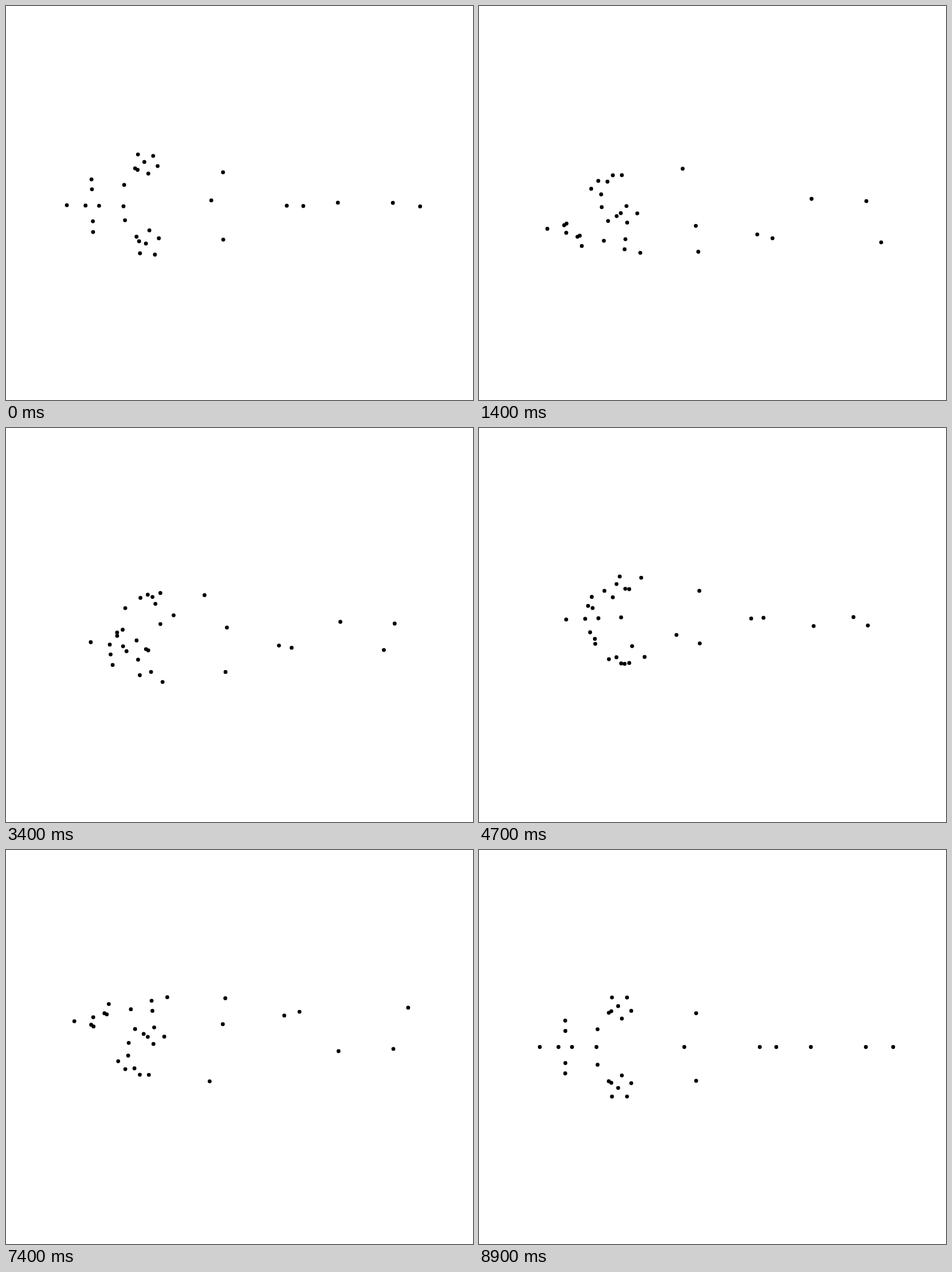
These frames come from a looping animation (815 by 687 pixels, 9000 ms). An HTML page with a canvas:

```html
<!DOCTYPE html>
<html lang="en">
<head>
<meta charset="utf-8">
<title>Rotating points</title>
<style>
  html, body { margin: 0; width: 100%; height: 100%; overflow: hidden; background: #fff; }
  canvas { display: block; }
</style>
</head>
<body>
<canvas id="stage" width="815" height="687"></canvas>
<script>
const canvas = document.getElementById('stage');
const ctx = canvas.getContext('2d');
const { width, height } = canvas;
const DISTANCE = 595, RADIUS = 3.4, TURN = 2 * Math.PI;
const STEP = 100, STEPS = 90;

const point = (x, y, z) => ({ x, y, z });
// Points on a straight line in the plane of symmetry
const line = (z0, slope, ...xs) => xs.map(x => point(x, 0, z0 + slope * x));
// A point and its reflection in that plane
const pair = (x, y, z) => [point(x, y, z), point(x, -y, z)];

const ridge = line(111, 0.222, -276.2, -243, -219.5, -178.2);
const keel = line(-16.8, 0.048, 174.1, 269.4);
const fin = [...line(39.3, 0.28, 74.2, 98.8), point(276, 0, 74.2), point(-55.3, 0, -73.4)];
const front = [pair(-229.6, 41.1, 63.4), pair(-234, 25.5, 52.7), pair(-203.7, 31.4, -9.4)];
const flank = [
  pair(-164.3, 51.5, -23), pair(-145.2, 64.6, -14.2), pair(-182.8, 60.3, -6),
  pair(-164, 71, 2.5), pair(-165.9, 81.7, 32.4), pair(-133.7, 77.4, 61.7),
  pair(-157.7, 55.8, 63.5)
];
const back = pair(-25.2, 52, 69.8);
const points = [...ridge, ...keel, ...fin, ...front.flat(), ...flank.flat(), ...back];

// Turn about the x axis, then project in perspective
function project({ x, y, z }, angle) {
  const cos = Math.cos(angle), sin = Math.sin(angle);
  const scale = DISTANCE / (DISTANCE - z * cos + y * sin);
  return [width / 2 + x * scale, height / 2 + (y * cos + z * sin) * scale];
}

function draw() {
  const step = Math.floor(performance.now() / STEP) % STEPS;
  const angle = (step + 1) / STEPS * TURN;
  ctx.clearRect(0, 0, width, height);
  for (const p of points) {
    ctx.beginPath();
    ctx.arc(...project(p, angle), RADIUS, 0, TURN);
    ctx.fill();
  }
  requestAnimationFrame(draw);
}
draw();
</script>
</body>
</html>
```
